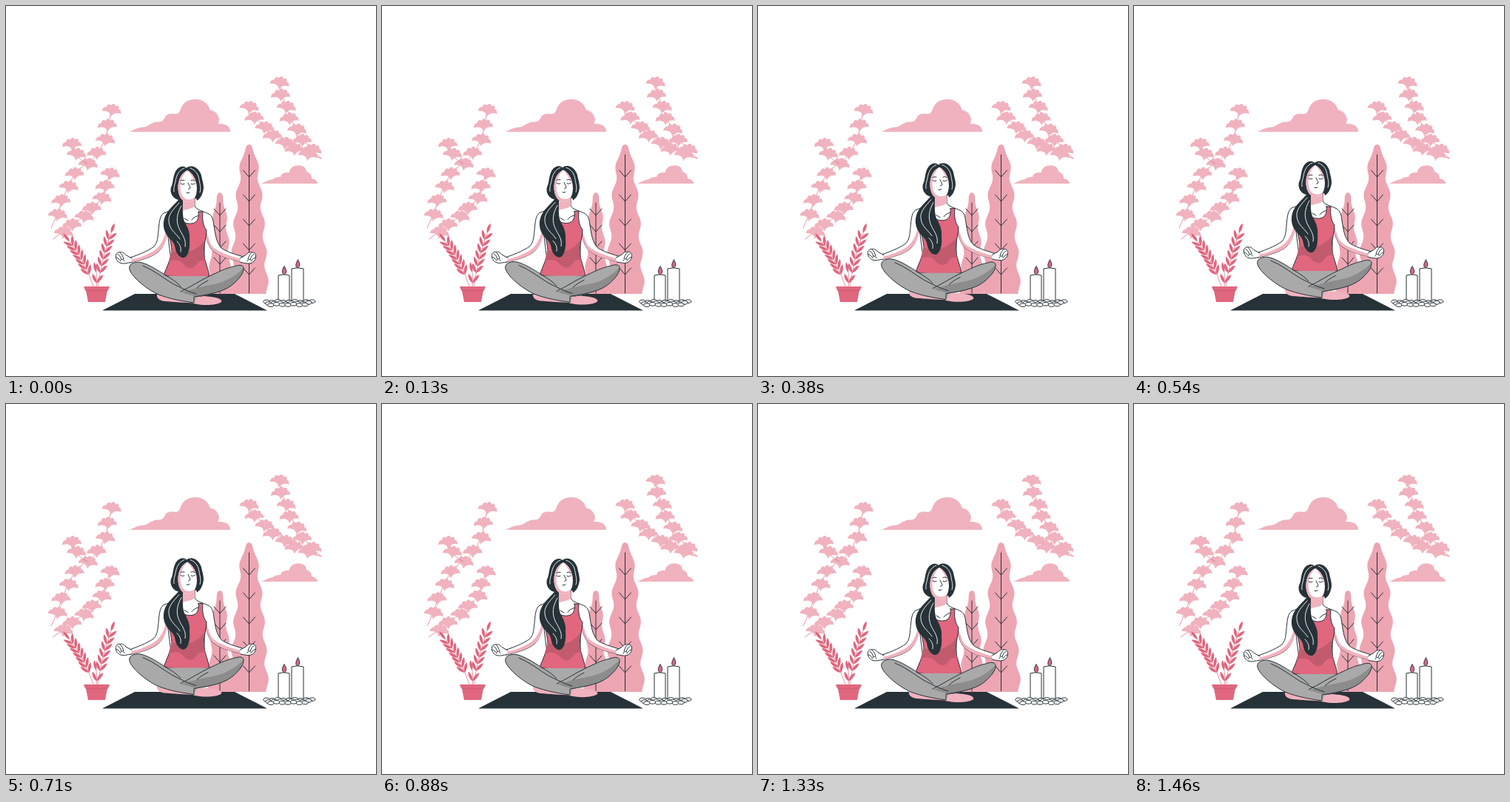
An HTML page for the animation above (1500 ms loop, 500 px wide and 500 px high).

```html
<!DOCTYPE html>
<html lang="en">
<head>
<meta charset="utf-8">
<title>Meditation</title>
<style>
html, body { margin: 0; height: 100%; overflow: hidden; background: #fff; }
svg { display: block; width: 100vw; height: 100vh; }
.light { fill: #f0b2be; }
.tree { fill: #eda5b2; }
.rose { fill: #e0677e; }
.deep { fill: #c25b6e; }
.ink { fill: #263238; }
.white { fill: #fff; }
.gray { fill: #a9a9a9; }
.shade { fill: #8c8c8c; }
.line { stroke: #263238; stroke-width: 1; stroke-linecap: round; stroke-linejoin: round; }
.bare { fill: none; }
.stem { fill: none; stroke: #e0677e; stroke-width: .7; }
.shine { fill: none; stroke: #fff; stroke-width: .9; stroke-linecap: round; }
</style>
</head>
<body>
<svg viewBox="0 0 500 500">
  <defs>
    <path id="fan" d="M0 10C-1 4-6 2-13 4C-13 0-10-3-8-2C-8-6-4-8-2-5C-1-9 4-9 4-5C7-8 10-5 9-2C12-2 13 1 13 4C7 2 2 5 0 10Z"/>
    <path id="leaf" d="M0 0C4-3 10-3 14 0C9 2.500 4 2 0 0Z"/>
    <g id="hand">
      <path class="white line" d="M170 341L162 336.500C159 333 156 332 154 333C151 332 148 335 148.500 338C148 342 151 346 155 347.500C159 349 164 347 169 346.500"/>
      <path class="bare line" d="M151 335.500C153 336 155 339 156 342.500M154 333C156 335 158 338 159 342M149 340C152 340 153 343 155 345M155 343.500C157 341.500 159 342 160 345"/>
    </g>
  </defs>

  <path class="light" d="M167 170C172 168 178 164 184 164C191 164 194 159 201 157C207 156 212 158 215 150C218 145 225 145 230 146C235 145 235 141 237 137C242 124 262 123 270 131C275 135 274 139 277 141C284 142 287 148 288 153C288 158 284 160 290 159C298 160 303 163 303 170Z"/>
  <path class="light" d="M345 240C352 237 355 235 361 234C364 231 368 231 371 231C373 224 379 225 383 225C383 219 389 215 395 215.500C402 215 406 219 406 224C412 226 413 229 413 233C418 234 421 237 421 240Z"/>

  <g id="trees"></g>
  <g id="blossoms" class="light"></g>
  <g id="plant" class="rose"></g>
  <path class="rose" d="M105 379H140L138 384.500H137L134 400H111L108 384.500H107Z"/>
  <path class="bare" stroke="#c25b6e" stroke-width=".8" d="M108 384.700H137"/>
  <path class="ink" d="M174 389H309L353 411.500H130Z"/>

  <g class="white line">
    <path d="M368 398V364Q375.500 361.500 383 364V398Z"/>
    <path d="M386 398V355Q394 352.500 402 355V398Z"/>
    <path class="rose" d="M376 352C380 357 379 362 376 363C373 362 372 357 376 352ZM394.500 343C398 348 397 353 394 354C391 353 391 348 394.500 343Z"/>
    <g id="stones"></g>
  </g>

  <g id="woman">
    <path class="light" d="M204 390C203 394 207 398 214 399C226 400 242 401 254 401.500V392Z"/>
    <path class="light" d="M253 394V402C264 405 285 405 291 400C293 395 281 393 268 392Z"/>

    <path class="white line" d="M238 256V268C236 274 222 276 213 280C207 284 207 295 206 304C205 313 205 319 200 325C191 332 174 338 165 341L167 347C181 344 199 339 206 332C213 326 215 318 218 304L225 360H268L268 302C271 315 274 327 281 332C292 340 310 344 320 346L324 340C311 336 297 332 291 327C284 319 283 309 281 297C280 289 279 284 274 281C267 277 257 276 255 270V256Z"/>
    <path class="light" d="M217 301C213 317 208 326 198 332C189 337 178 341 168 343L167 347C181 344 199 339 206 332C214 326 216 317 220 304ZM268 301C272 305 273 312 276 320C280 329 291 334 320 343V346C308 344 292 340 281 332C274 327 271 315 268 303ZM238 260H255V270C252 275 244 274 238 277Z"/>
    <path class="bare line" d="M241 287L246 290M251 289C253 286 257 284 261 283"/>

    <path class="rose line" d="M260 278L266 278C265 288 266 297 271 303C271 313 267 323 267 333C268 344 273 354 275 365C258 367 229 367 213 364C218 350 224 340 224 330C223 320 221 313 219 306C223 300 225 290 226 283L231 281C233 291 244 295 251 294C259 293 261 286 260 278Z"/>
    <path class="deep" d="M224 330C240 338 258 331 268 317C266 330 267 337 270 346C264 341 260 345 256 351C250 357 244 354 239 348C233 342 226 343 219.500 346Z"/>

    <path class="gray" d="M182 346.500C173 345 165 349 167 356C170 366 189 382 205 389.500C221 396 240 399 254 401L258 393C280 389 298 385 309 374C315 368 320 363 321 356C322 350 316 349 308 352C297 354 286 360 275 365H216C205 357 193 349 182 346.500Z"/>
    <path class="shade" d="M237 387C261 379 275 378 289 374C302 370 313 362 321 354C320 364 315 368 309 374C298 385 280 389 258 393Z"/>
    <path class="bare line" d="M216 364C205 357 193 349 182 346.500C173 345 165 349 167 356C170 366 189 382 205 389.500C221 396 240 399 254 401V393C280 389 298 385 309 374C315 368 320 363 321 356C322 350 316 349 308 352C297 354 286 360 275 365C262 371 249 380 236 386M185 351C200 357 213 368 225 375C237 381 246 386 257 389M216 364C224 369 231 373 236 379M273 371C267 374 262 377 258 381"/>
    <use href="#hand"/>
    <use href="#hand" transform="matrix(-1 0 0 1 486 0)"/>

    <path class="ink" d="M244 219C239 214 231 218 228 226C225 234 226 239 223 245C221 252 225 260 233 262C225 271 217 277 214 287C211 297 214 307 221 314C227 320 228 322 229 329C231 336 236 341 241 340C247 337 249 326 248 315C249 306 245 298 241 291C238 283 239 273 239 263L257 260L258 263C263 260 266 254 267 246C267 239 265 235 264 229C261 219 251 213 244 219Z"/>
    <path class="white" d="M245 222C237 226 233 234 232.500 244C232 257 238 265 245.500 265C253 265 258 258 258 246C257 235 253 226 245 222Z"/>
    <path class="light" d="M245 222C237 226 233 234 232.500 244C232 257 238 265 245.500 265C250 265 254 262 256 258C249 264 240 262 237 254C234 244 235 232 245 222ZM245 222C251 229 255 235 258 246C258 236 253 226 245 222Z"/>
    <path class="bare line" d="M236 240Q238.500 242 241 240.500M250 240.500Q252.500 242 255 240M236 236Q238 234.500 241 235.500M250 235.500Q253 234 255 236M246 239C247 242 249 244 249 246L246.500 247.500M244 252.500Q246 253.500 248 252"/>
    <path class="shine" d="M241 219C233 222 230 230 229 237C228 242 226 246 227 251M249 219C257 222 260 228 261 235C262 241 264 246 262 252M234 266C226 275 219 282 220 291C221 303 230 307 235 315M237 270C230 282 230 292 234 301C238 309 244 316 242 325M231 318C236 323 237 328 236 332"/>
  </g>
</svg>
<script>
const el = id => document.getElementById(id);
const repeat = (n, make) => Array.from({ length: n }, (_, i) => make(i)).join('');
const place = (id, x, y, angle) => `<use href="#${id}" transform="translate(${x} ${y}) rotate(${angle})"/>`;

// Rippled outline that widens downwards, with a veined trunk
function tree(x, top, width, firstBump, period, ripple, veinTop, veinGap) {
  const bottom = 389, left = [], right = [];
  for (let y = top; y <= bottom; y++) {
    const grow = ((y - top) / (bottom - top)) ** .42;
    const half = width * grow + ripple * Math.min(1, grow * 2) * Math.cos((y - firstBump) / period * 2 * Math.PI);
    const w = Math.max(0, half);
    left.unshift(`${x - w} ${y}`);
    right.push(`${x + w} ${y}`);
  }
  const veins = repeat(5, i => `M${x - 8} ${veinTop + i * veinGap - 9}l8 9l8-9`);
  return `<path class="tree" d="M${right.concat(left).join('L')}Z"/>` +
    `<path class="bare line" d="M${x} ${top + 14}V388${veins}"/>`;
}
el('trees').innerHTML = tree(328.500, 187, 25, 215, 39, 2.200, 231, 33) +
  tree(289, 252, 15, 284, 34, 1.500, 283, 22);

// Items spaced along a curve, from a start fraction to its tip
function along(d, n, start, make) {
  const path = document.createElementNS('http://www.w3.org/2000/svg', 'path');
  path.setAttribute('d', d);
  const total = path.getTotalLength();
  return `<path class="stem" d="${d}"/>` + repeat(n, i => {
    const at = total * (start + (1 - start) * i / (n - 1));
    const p = path.getPointAtLength(at), q = path.getPointAtLength(at - 1);
    return make(p, Math.atan2(p.y - q.y, p.x - q.x) * 180 / Math.PI, i);
  });
}

const branch = (d, n, start) => along(d, n, start, (p, angle, i) =>
  place('fan', p.x + (i % 2 ? -2 : 1), p.y, i % 2 ? -2 : 9));
el('blossoms').innerHTML =
  branch('M61 300C78 265 84 225 110 213C132 196 138 172 142 140', 9, .11) +
  branch('M110 213Q92 205 91 186', 2, .6) +
  branch('M63 315C85 300 112 280 125 265C134 253 136 242 140 226', 7, .14) +
  branch('M426 206C406 190 380 158 369 103', 7, .15) +
  branch('M426 206C380 192 345 168 328 136', 7, .16);

const frond = (d, n) => along(d, n, .25, (p, angle, i) =>
  (i < n - 1 ? [-32, 32] : [0]).map(side => place('leaf', p.x, p.y, angle + side)).join(''));
el('plant').innerHTML = frond('M118 379Q107 345 86 318', 8) +
  frond('M124 379Q130 340 142 307', 7) + frond('M122 379Q124 370 122 360', 2);

el('stones').innerHTML = repeat(3, row => repeat(9 - row, i =>
  `<ellipse cx="${352 + row * 3 + i * 7.700}" cy="${399.500 + row * 2 + Math.sin(i * 2.300 + row) * .7}" rx="4.200" ry="2.300"/>`));

function draw() {
  const lift = 4.250 * (1 - Math.cos(performance.now() / 1500 * 2 * Math.PI));
  el('woman').setAttribute('transform', `translate(0 ${-lift})`);
  requestAnimationFrame(draw);
}
draw();
</script>
</body>
</html>
```
